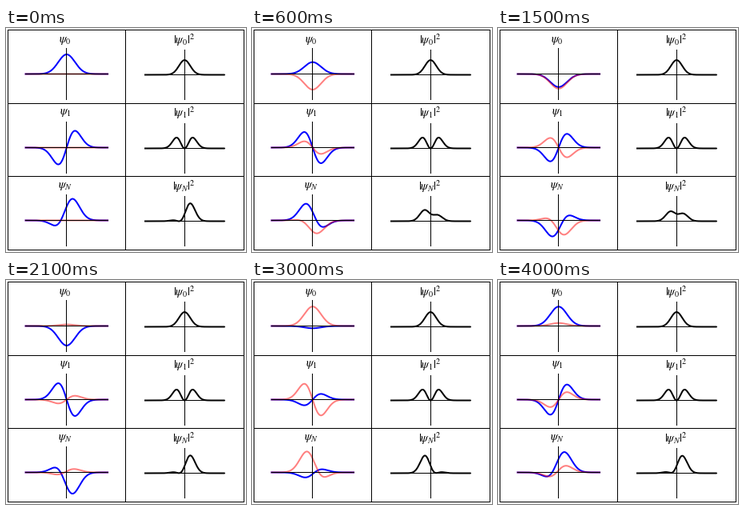
Write a matplotlib script that moves like this. It is 300 px wide and 280 px high and loops after 4100 ms.

```python
import numpy as np
import matplotlib.pyplot as plt
from matplotlib.animation import FuncAnimation

W, H, DPI = 300, 280, 100
FRAMES, INTERVAL = 41, 100
PX = 72 / DPI            # one pixel in points
UNIT = 32.6              # pixels per unit of amplitude or density

plt.rcParams["mathtext.fontset"] = "stix"

fig = plt.figure(figsize=(W / DPI, H / DPI), dpi=DPI, facecolor="white")
ax = fig.add_axes([0, 0, 1, 1])
ax.set_xlim(0, W)
ax.set_ylim(H, 0)
ax.axis("off")


def rule(x0, y0, x1, y1):
    ax.plot([x0, x1], [y0, y1], color="black", lw=PX, snap=False,
            solid_capstyle="butt", zorder=4)


def label(x, y, text):
    ax.text(x, y, text, fontsize=14.5 * PX, ha="center", va="baseline")


def curve(color, alpha=1, zorder=2):
    return ax.plot([], [], color=color, alpha=alpha, lw=2 * PX, snap=False,
                   solid_capstyle="butt", zorder=zorder)[0]


# Table grid
for gx in (2.5, 149.5, 297.5):
    rule(gx, 2, gx, 278)
for gy in (2.5, 94.5, 185.5, 277.5):
    rule(2, gy, 298, gy)

# Stationary states of the harmonic oscillator
x = np.linspace(-5, 5, 401)
ground = np.pi ** -0.25 * np.exp(-x ** 2 / 2)
excited = np.sqrt(2) * x * ground

wave_x = 75.8 + 10.45 * x
density_x = 223.25 + 10.05 * x

rows = []
for name, wave_y, density_y, wave_text, density_text in (
        ("0", 57.5, 58.5, 18, 20),
        ("1", 149.5, 150.5, 108, 111),
        ("N", 240.5, 241.5, 200, 203)):
    label(74, wave_text, rf"$\psi_{name}$")
    label(222.5, density_text, rf"$|\psi_{name}|^2$")
    rule(24, wave_y, 128, wave_y)
    rule(75.5, wave_y - 32.5, 75.5, wave_y + 32.5)
    rule(173, density_y, 274, density_y)
    rule(223.5, density_y - 31.5, 223.5, density_y + 31.5)
    rows.append((wave_y, density_y, curve("blue"),
                 curve("red", 0.5, 3), curve("black")))


def update(i):
    phase = 2 * np.pi * i / FRAMES
    psi0 = ground * np.exp(-1j * phase)
    psi1 = excited * np.exp(-3j * phase)
    mixed = (psi0 + psi1) / np.sqrt(2)
    artists = []
    for psi, (wy, dy, real, imag, density) in zip((psi0, psi1, mixed), rows):
        real.set_data(wave_x, wy - UNIT * psi.real)
        imag.set_data(wave_x, wy - UNIT * psi.imag)
        density.set_data(density_x, dy - UNIT * np.abs(psi) ** 2)
        artists += [real, imag, density]
    return artists


anim = FuncAnimation(fig, update, frames=FRAMES, interval=INTERVAL,
                     repeat=True, repeat_delay=0)
plt.show()
```
